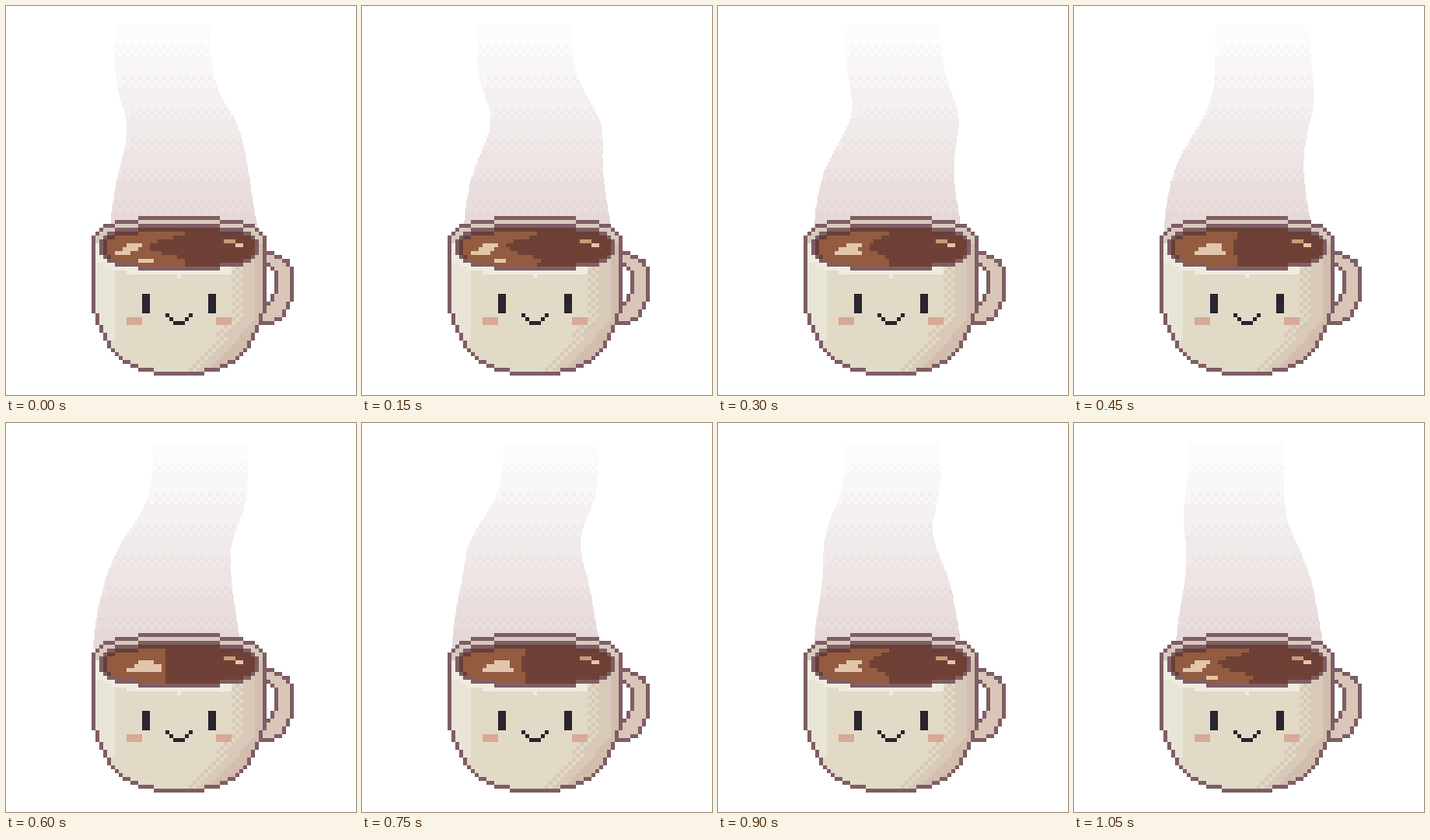
Write an HTML page with a canvas that moves like this. It is 360 by 400 pixels and loops after 1200 ms.

```html
<!DOCTYPE html>
<html lang="en">
<head>
<meta charset="utf-8">
<title>Coffee cup</title>
<style>
html, body { margin: 0; width: 100%; height: 100%; overflow: hidden; background: #fff; }
canvas { display: block; }
</style>
</head>
<body>
<canvas id="stage" width="360" height="400"></canvas>
<script>
const ctx = document.getElementById('stage').getContext('2d');
const CELL = 4, STEP = 150, STEPS = 8, AXIS = 44.5;
const OUTLINE = '#7f5e65', INK = '#2b2530', CREAM = '#e2c5aa';
const { abs, cos, sin, exp, tanh, floor, round, max, min, PI } = Math;

function cells(x, y, w, h, color) {
  ctx.fillStyle = color;
  ctx.fillRect(x * CELL, y * CELL, w * CELL, h * CELL);
}

// Rounded oval tested at the middle of a cell.
const inOval = (x, y, cx, cy, rx, ry) =>
  abs((x + 0.5 - cx) / rx) ** 2.5 + abs((y + 0.5 - cy) / ry) ** 2.5 <= 1;

function inCup(x, y) {
  if (y < 62) return inOval(x, y, AXIS, 61.5, 22.9, 7.5);
  if (y < 68) return abs(x + 0.5 - AXIS) < 22.9;
  return inOval(x, y, AXIS, 68, 22.9, 27);
}

const inOpening = (x, y) => inOval(x, y, AXIS, 62, 20.9, 6);
const inLip = (x, y) => inOval(x, y, AXIS, 62, 22.5, 7.5);

function inHandle(x, y) {
  const upper = y < 70;
  return inOval(x, y, 65, 70.5, 9, upper ? 7.5 : 11.5)
    && !inOval(x, y, 65, 70.5, 4, upper ? 3.5 : 6);
}

function paint(inside, fill) {
  for (let y = 54; y < 95; y++) {
    for (let x = 22; x < 75; x++) {
      if (!inside(x, y)) continue;
      const inner = inside(x - 1, y) && inside(x + 1, y) && inside(x, y - 1) && inside(x, y + 1);
      cells(x, y, 1, 1, inner ? fill(x, y) : OUTLINE);
    }
  }
}

function cupColor(x, y) {
  if (y < 61) return '#d8c9bd';
  const checker = (x + y) % 2 === 0;
  const shade = x - AXIS + max(0, y - 80) * 0.9;
  if (shade > 19) return '#d2bdae';
  if (shade > 16) return '#d9c9b8';
  if (shade > 13) return checker ? '#d9c9b8' : '#e0d9c6';
  if (inLip(x, y)) return '#efebe0';
  return x - AXIS < -17 && y < 86 ? '#e8e4d6' : '#e0dac7';
}

// The plume leans one way at its top and the other at its foot, with a bend rising between.
function plume(y, angle) {
  const lean = 5.5 - 14 * tanh((y - 102) / 28);
  const bend = 13 * exp(-(((y - 112) / 38) ** 2));
  const sway = bend * sin(angle) - lean * cos(angle);
  return {
    left: round(114.5 - 18 * tanh((y - 145) / 60) + sway),
    right: round(229 + 22 * ((y - 20) / 210) ** 1.7 + sway)
  };
}

function steamColor(level) {
  const t = min(level / 6, 1);
  return `rgb(${round(253 - 24 * t)},${round(252 - 36 * t)},${round(252 - 37 * t)})`;
}

function drawSteam(angle) {
  for (let y = 20; y < 230; y += CELL) {
    const { left, right } = plume(y, angle);
    const depth = (y - 20) / 32, level = floor(depth);
    ctx.fillStyle = steamColor(level);
    ctx.fillRect(left, y, right - left, CELL);
    if (depth - level < 0.6) continue;
    ctx.fillStyle = steamColor(level + 1);
    const first = Math.ceil(left / 8) * 8 + (y / CELL % 2) * CELL;
    for (let x = first; x < right; x += 2 * CELL) {
      ctx.fillRect(x, y, min(CELL, right - x), CELL);
    }
  }
}

function drawCoffee(angle) {
  const swirl = (1 + cos(angle)) / 2, calm = 1 - swirl;
  paint(inOpening, (x, y) => {
    if (!inOpening(x, y - 2) || !inOpening(x - 2, y)) return '#683f39';
    const edge = 41 + 5 * swirl * cos(2 * PI * ((y - 58) / 8 + 0.08));
    return x < edge ? '#935c40' : '#6f4136';
  });
  for (let i = 0; i < 3; i++) {
    cells(round(31 + 3 * calm - 1.5 * i), 61 + i, round(4 + 2.5 * calm * i), 1, CREAM);
  }
  cells(34, 65, max(0, round(8 * (swirl - 0.5))), 1, CREAM);
  cells(56, 60, 3, 1, '#c99a76');
  cells(59, 61, 2, 1, CREAM);
}

function drawFace() {
  for (const x of [35, 52]) cells(x, 74, 2, 5, INK);
  for (const x of [31, 54]) cells(x, 80, 4, 2, '#d8a994');
  for (let dx = -3; dx <= 3; dx++) cells(44 + dx, 81 - max(0, abs(dx) - 1), 1, 1, INK);
}

function draw(pose) {
  const angle = 2 * PI * pose / STEPS;
  ctx.fillStyle = '#fff';
  ctx.fillRect(0, 0, 360, 400);
  drawSteam(angle);
  paint(inHandle, () => '#d9c6b8');
  paint(inCup, cupColor);
  drawCoffee(angle);
  drawFace();
}

const start = performance.now();
let shown = 0;
draw(shown);

function tick() {
  const pose = floor((performance.now() - start) / STEP) % STEPS;
  if (pose !== shown) draw(shown = pose);
  requestAnimationFrame(tick);
}
requestAnimationFrame(tick);
</script>
</body>
</html>
```
